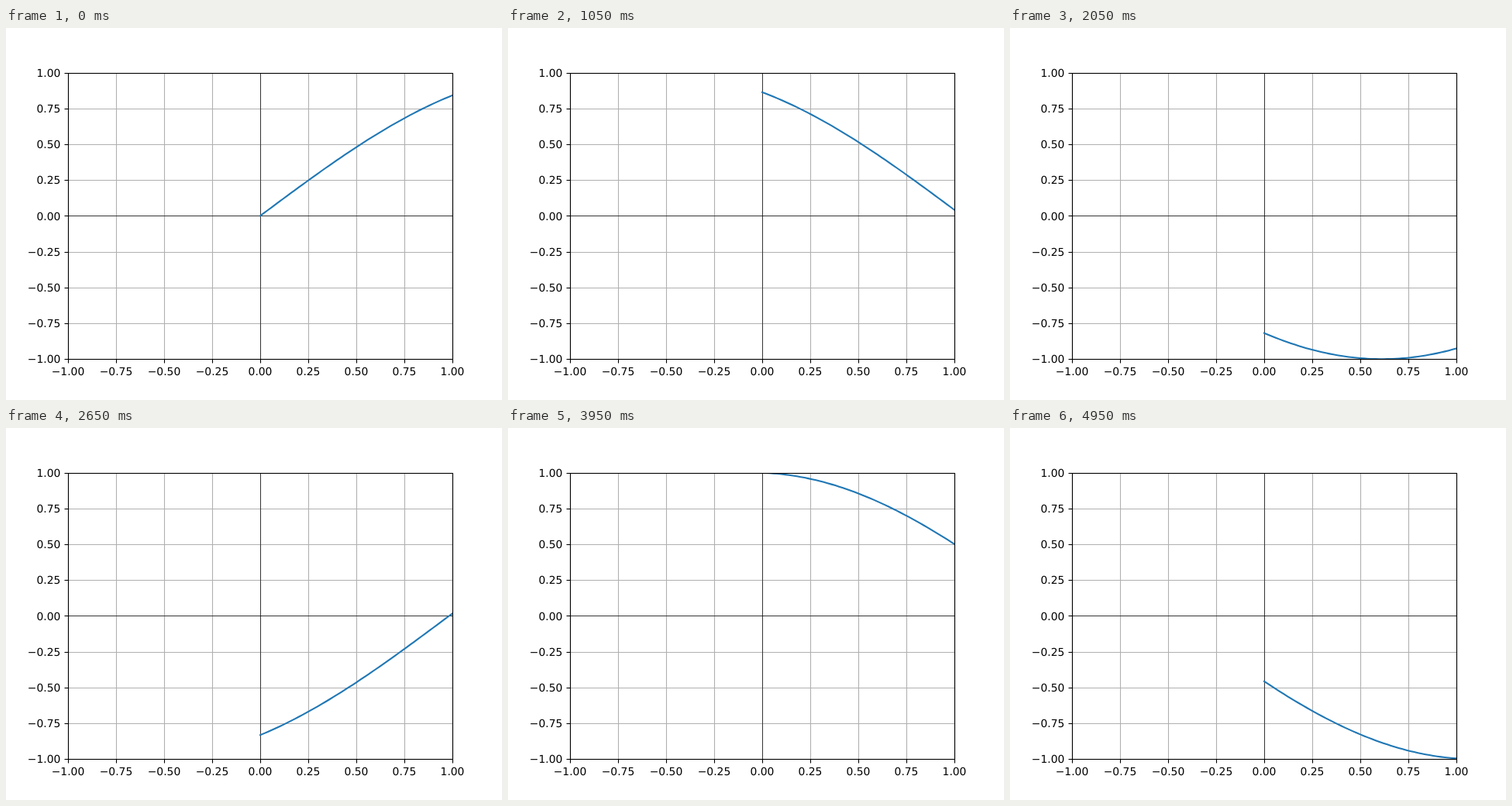
An HTML page with a canvas for the animation above (5 s loop, 640x480 px).

```html
<!DOCTYPE html>
<html>
<head>
<meta charset="utf-8">
<style>
  html, body { margin: 0; overflow: hidden; background: #fff; }
  canvas { display: block; }
</style>
</head>
<body>
<canvas id="plot" width="640" height="480"></canvas>
<script>
const ctx = document.getElementById('plot').getContext('2d');
const PT = 100 / 72; // pixels per point
const STEP = 50, STEPS = 100;
const toX = x => 328 + 248 * x;
const toY = y => 242.4 - 184.8 * y;
const snap = v => Math.round(v) + 0.5;
const ticks = Array.from({ length: 9 }, (_, i) => i / 4 - 1);
const left = snap(toX(-1)), right = snap(toX(1));
const top_ = snap(toY(1)), bottom = snap(toY(-1));

function line(x1, y1, x2, y2, color, points) {
  ctx.strokeStyle = color;
  ctx.lineWidth = points * PT;
  ctx.beginPath();
  ctx.moveTo(x1, y1);
  ctx.lineTo(x2, y2);
  ctx.stroke();
}

function drawGrid() {
  for (const v of ticks) {
    const x = snap(toX(v)), y = snap(toY(v));
    line(x, top_, x, bottom, '#b0b0b0', 0.8);
    line(left, y, right, y, '#b0b0b0', 0.8);
  }
  const x0 = snap(toX(0)), y0 = snap(toY(0));
  line(left, y0, right, y0, '#000', 0.5);
  line(x0, top_, x0, bottom, '#000', 0.5);
}

function drawCurve(phase) {
  ctx.save();
  ctx.beginPath();
  ctx.rect(80, 58, 497, 370);
  ctx.clip();
  ctx.strokeStyle = '#1f77b4';
  ctx.lineWidth = 1.5 * PT;
  ctx.lineCap = 'square';
  ctx.lineJoin = 'round';
  ctx.beginPath();
  for (let i = 0; i <= 60; i++) {
    const x = i / 50;
    ctx.lineTo(toX(x), toY(Math.sin(x + phase)));
  }
  ctx.stroke();
  ctx.restore();
}

function drawFrame() {
  ctx.font = 10 * PT + 'px "DejaVu Sans", sans-serif';
  ctx.textRendering = 'geometricPrecision';
  ctx.fillStyle = '#000';
  for (const v of ticks) {
    const x = snap(toX(v)), y = snap(toY(v));
    const label = v.toFixed(2).replace('-', '\u2212');
    line(x, bottom, x, 432.5, '#000', 0.8);
    line(75.5, y, left, y, '#000', 0.8);
    ctx.textAlign = 'center';
    ctx.fillText(label, toX(v), 448);
    ctx.textAlign = 'right';
    ctx.fillText(label, 70.3, Math.round(toY(v) + 5.2));
  }
  ctx.strokeStyle = '#000';
  ctx.lineWidth = 0.8 * PT;
  ctx.strokeRect(left, top_, right - left, bottom - top_);
}

function draw(now) {
  const step = Math.floor(now / STEP) % STEPS;
  ctx.fillStyle = '#fff';
  ctx.fillRect(0, 0, 640, 480);
  drawGrid();
  drawCurve(step / 10);
  drawFrame();
}

let start;
function tick(now) {
  start ??= now;
  draw(now - start);
  requestAnimationFrame(tick);
}
draw(0);
requestAnimationFrame(tick);
</script>
</body>
</html>
```
